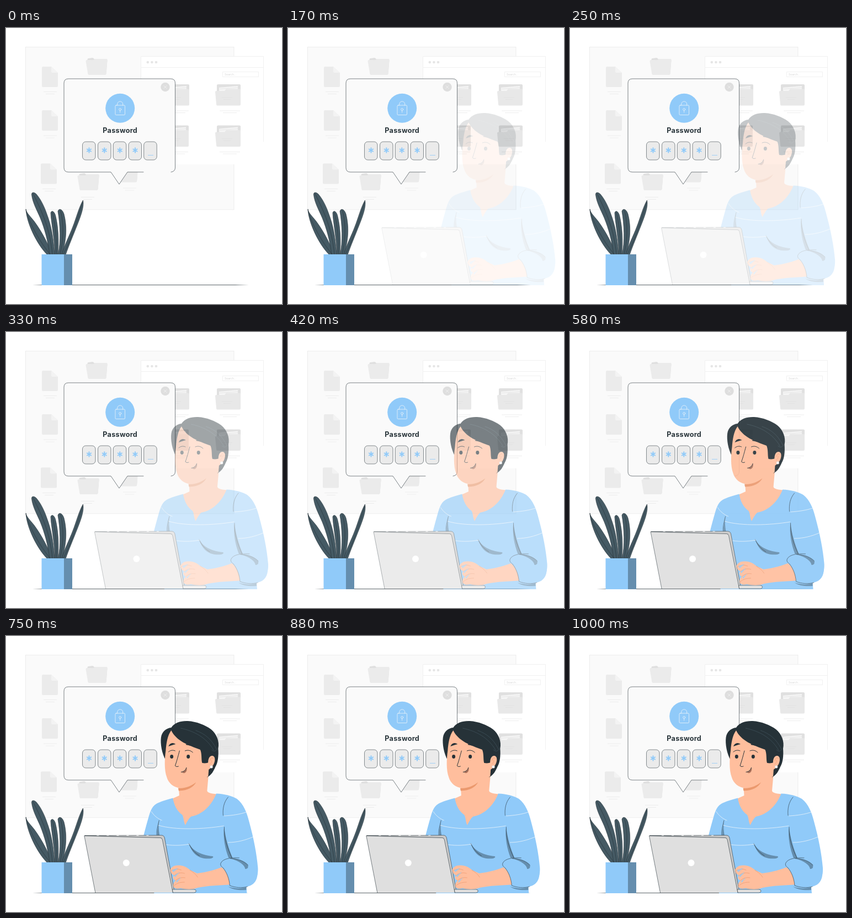
Animation of 500 by 500 pixels, one loop 1040 ms. Source, as an HTML page:

```html
<!DOCTYPE html>
<html lang="en">
<head>
<meta charset="utf-8">
<title>Password prompt</title>
<style>
  html, body { margin: 0; width: 100%; height: 100%; overflow: hidden; background: #fff; }
  svg { display: block; width: 100%; height: 100%; }
  text { font-family: Inter, "Open Sans", sans-serif; }
  .blue { fill: #90caf9; }
  .shade { fill: #658eae; }
  .dark { fill: #263238; }
  .skin { fill: #ffbe9d; }
  .ink { fill: none; stroke: #263238; stroke-width: .6; stroke-linecap: round; stroke-linejoin: round; }
  .pale { fill: none; stroke: #fafafa; stroke-width: .7; stroke-linecap: round; }
  .fold { fill: none; stroke: #eb996e; stroke-width: .7; stroke-linecap: round; }
  .caption { fill: none; stroke: #ebebeb; stroke-width: .9; }
  .frame { fill: none; stroke: #ebebeb; stroke-width: .7; }
  .leaves { fill: #455a64; stroke: #263238; stroke-width: .6; }
</style>
</head>
<body>
<svg viewBox="0 0 500 500">
  <defs>
    <g id="file">
      <path fill="#ebebeb" d="M2 0H17L29 11V35Q29 37 27 37H2Q0 37 0 35V2Q0 0 2 0Z"/>
      <path fill="#f3f3f3" d="M17 0L29 11H19Q17 11 17 9Z"/>
    </g>
    <path id="lines" class="caption" d="M0 0H24M4 4H20"/>
    <g id="folder">
      <path fill="#e0e0e0" d="M3 3Q3 1 5 1L12 0Q14 0 15 2L37 2Q39 2 39 5L37 29H4Z"/>
      <path fill="#ebebeb" d="M0 6Q0 4 2 4H14L16 2H37Q39 2 39 4L37 29Q37 31 35 31H6Q4 31 4 29Z"/>
    </g>
    <g id="docs">
      <path fill="#e0e0e0" d="M3 2Q3 0 5 0H44Q46 0 46 2V36H3Z"/>
      <path fill="#f5f5f5" d="M7 6L41 3V15H7Z"/>
      <path fill="none" stroke="#e6e6e6" d="M8 8.5L41 6"/>
      <path fill="#e8e8e8" d="M0 14Q0 12 2 12H17L20 8.5H44Q46 8.5 46 10.5V36Q46 38.5 44 38.5H4Q2 38.5 2 36Z"/>
      <path fill="none" stroke="#e0e0e0" stroke-width=".7" d="M12 24H31M15 27.500H28"/>
      <path class="caption" d="M8 48H45M14 51.500H39"/>
    </g>
    <path id="star" fill="none" stroke="#90caf9" stroke-width="2" d="M0-5V5M-4.300-2.500L4.300 2.500M-4.300 2.500L4.300-2.500"/>
    <rect id="cell" width="23.500" height="33" rx="6" fill="#ebebeb" stroke="#263238" stroke-width=".55"/>
  </defs>

  <!-- desktop panel -->
  <rect x="35.500" y="34.500" width="377.500" height="294.500" fill="#fafafa" stroke="#ebebeb" stroke-width=".9"/>
  <use href="#file" x="65" y="70"/><use href="#lines" x="68" y="115.500"/>
  <use href="#file" x="65" y="149"/><use href="#lines" x="68" y="195"/>
  <use href="#file" x="63" y="245.500"/><use href="#lines" x="66" y="291.500"/>
  <use href="#folder" x="144.500" y="54"/>
  <use href="#folder" x="129.500" y="263"/><use href="#lines" x="136" y="306.500"/>
  <use href="#folder" x="200" y="248.500"/><use href="#lines" x="212" y="290"/>

  <!-- browser window -->
  <path fill="#fff" d="M244.500 51.500H466.500V247H244.500Z"/>
  <path class="frame" d="M244.500 247V51.500H466.500V206M244.500 71.500H466.500"/>
  <g fill="#e6e6e6">
    <circle cx="256.800" cy="62" r="2.300"/><circle cx="264.400" cy="62" r="2.300"/><circle cx="272" cy="62" r="2.300"/>
  </g>
  <path class="frame" d="M392.500 79.500H457.500V88.500H392.500Z"/>
  <text x="396" y="85.500" font-size="5" fill="#d6d6d6">Search...</text>
  <use href="#docs" x="379" y="102"/><use href="#docs" x="379" y="176.500"/>
  <use href="#docs" x="286" y="102"/><use href="#docs" x="285" y="176.500"/>

  <!-- dialog -->
  <path fill="#fafafa" d="M113 92H298.500Q306.500 92 306.500 100V253Q306.500 261 298.500 261H220L205 283L190 261H113Q105 261 105 253V100Q105 92 113 92Z"/>
  <path class="ink" d="M249 261H220L205 283L190 261H113Q105 261 105 253V100Q105 92 113 92H298.500Q306.500 92 306.500 100V253Q306.500 260 299 261"/>
  <circle cx="288.500" cy="107" r="8.200" fill="#dedede"/>
  <path class="pale" d="M286 104.500L291 109.500M291 104.500L286 109.500"/>
  <circle class="blue" cx="206.700" cy="145.300" r="26.500"/>
  <rect class="pale" x="198" y="140" width="17.500" height="17.500" rx="1.500"/>
  <path class="pale" d="M201.700 140V138A5 5 0 0 1 211.700 138V140M206.700 149.500V153"/>
  <circle class="pale" cx="206.700" cy="147.500" r="2"/>
  <text class="dark" x="206.700" y="190.300" font-size="12.600" font-weight="700" letter-spacing=".3" text-anchor="middle">Password</text>
  <use href="#cell" x="138.500" y="206"/><use href="#cell" x="166.500" y="206"/>
  <use href="#cell" x="194.300" y="206"/><use href="#cell" x="222" y="206"/>
  <use href="#cell" x="249.700" y="206"/>
  <use href="#star" x="150.500" y="221.500"/><use href="#star" x="178.300" y="221.500"/>
  <use href="#star" x="206.300" y="221.500"/><use href="#star" x="234" y="221.500"/>
  <path fill="none" stroke="#90caf9" stroke-width=".8" d="M257 230.500H267"/>

  <!-- table and plant -->
  <path class="dark" d="M48 465.400L70 465.100H415L440 465.400L415 465.700H70Z"/>
  <g class="leaves">
    <path d="M36 328C37 352 55 391 75 411H84C78 395 66 370 51 350C44 341 37 335 36 328Z"/>
    <path d="M46.500 302C46 297 51 297 55 301C62 309 69 322 74 337C82 358 86 380 88 411H79C76 385 70 364 62 344C56 330 48 316 46.500 302Z"/>
    <path d="M81 335C82 330 87 331 89.500 339C95 360 96 388 94 411H88C89 386 82 355 81 335Z"/>
    <path d="M94 332C96 326 102 328 105 337C112 364 108 391 101 411H94C100 388 98 355 94 332Z"/>
    <path d="M139.500 312C142 324 135 342 129 357C122 375 113 396 108 411H101C105 395 115 376 121 360C127 345 132 325 139.500 312Z"/>
  </g>
  <path class="ink" d="M36 330C43 355 61 387 80 410M49 300C66 334 80 365 84 410M84 334C90 360 92 384 91 410M99 331C106 360 103 387 98 410M139 315C129 350 117 384 104 410"/>
  <rect class="blue" x="64.500" y="410" width="41" height="56"/>
  <rect class="shade" x="105" y="410" width="15" height="56"/>

  <g id="worker" opacity="0">
    <!-- neck and shirt -->
    <path class="skin" d="M314 262L315.500 289L300 296L326 344L390 305V287C374 286 366 284 366 280L370 235Z"/>
    <path class="blue" d="M304 293.500C292 297 281 300 274 304C264 310 262 322 258 335C255 346 252 356 250 366L270 466H438L437 454C451 450 459 438 458 420C456 395 450 365 442 336C438 320 432 304 420 295C412 290 398 286 382.500 285.500C374 308 356 324 337 327C333 330 330 336 326.500 342.500C323 336 324 329 321 324C312 318 306 307 304 293.500Z"/>
    <path class="shade" d="M397 346C394 364 399 387 405 402H412C405 385 399 366 397 346Z"/>
    <path class="shade" d="M333 376C341 389 352 396 376 399C378 400 377 402 373 403C354 405 340 398 333 376Z"/>
    <path class="shade" d="M279 335C277 346 275 354 276 362H280C278 352 278 344 279 335Z"/>
    <path class="shade" d="M404 454C416 458 428 458 437 455V460C426 461 412 460 404 454Z"/>
    <path class="ink" d="M404 292C396 301 394 313 395 325M397 346C396 364 403 386 411 402M333 376C337 386 344 393 352 398M279 334C276 346 274 354 275 362"/>
    <path class="pale" d="M265 318C270 326 277 331 284 334M278 343C308 352 360 350 396 344M397 326C412 325 426 323 437 319M286 377C300 380 318 380 334 377M404 374C420 374 435 370 449 364"/>

    <!-- head -->
    <path class="dark" d="M291 225C284 213 281 195 282.500 184C284 173 292 167 301 166C307 157 318 153.500 331 154C347 155 362 161 373 169C383 177 389 191 386 204C387 216 386 229 381 237C378 244 374 252 366 256L310 240Z"/>
    <path class="skin" d="M301 171C294 180 292 195 291 208C289 222 288 243 293 256C296 267 306 275 318 275.500C330 275 352 267 368 254L370 228L357 228C357 219 357 212 354 206C332 198 310 190 301 171Z"/>
    <path fill="#eb996e" d="M313.500 275.500C326 277 338 271 346 265C341 274 331 280 314.500 280.500Z"/>
    <path class="dark" d="M320 182C330 193 342 201 353 205C357 212 355 223 357 230C363 231 366 230 369 229L373 205L350 180Z"/>
    <path class="skin" d="M368 232C367 222 371 216 376 217C381 218 381 226 378 232C375 238 369 242 367 243Z"/>
    <path class="fold" d="M371 226C373 220 376 220 377 222M371 232C374 230 375 227 374 225"/>
    <circle cx="373.700" cy="237" r="2.500" fill="#fff" stroke="#bbb" stroke-width=".4"/>
    <path fill="none" stroke="#455a64" stroke-width=".6" d="M318 167C342 172 365 184 378 207M345 171C362 177 374 187 383 205M374 206C378 210 381 209 384 205"/>

    <path class="dark" d="M296 200C298 194 304 192 309 196C304 197 301 198 296 200Z"/>
    <path class="dark" d="M327 197C332 193 338 194 342 200C337 199 333 198 327 197Z"/>
    <path class="ink" style="stroke-width:1" d="M296 210C299 207 304 206 308 208M326 208C331 206 336 207 340 211M316 208C313 219 311 227 308 235C310 237 312 237 314 236"/>
    <ellipse class="dark" cx="301.800" cy="218.500" rx="3" ry="3.400"/>
    <ellipse class="dark" cx="331.800" cy="218.500" rx="3" ry="3.400"/>
    <path fill="#a9705a" d="M319 246.500C324 246 327 243 329 238.500C330 243 328 248 324 248.500Z"/>
    <path class="ink" style="stroke-width:1" d="M319 246.500C324 246 327 243 328.500 238.500"/>

    <!-- laptop -->
    <path fill="#c9c9c9" stroke="#263238" stroke-width=".6" d="M144 361.500L283 361Q288 361 289 366L306 459L303 465L283 366Z"/>
    <path fill="#dfdfdf" d="M143.500 362L281 365.500Q284 365.500 285 369L304 465H163.500Z"/>
    <path class="ink" d="M163.500 465L143.500 362L281 365.500Q284 365.500 285 369L304 465"/>
    <path fill="none" stroke="#fafafa" stroke-dasharray="4 14" d="M166 361.200H272"/>
    <circle cx="219.500" cy="411" r="6" fill="#fff"/>
    <path fill="#e0e0e0" stroke="#263238" stroke-width=".6" d="M303 459H342Q346 459 346 462T342 465H304Z"/>

    <!-- arm -->
    <path class="skin" d="M299 424C301 418 307 415 314 415.500C322 415 330 419 335 424L348 430C366 428 383 423 397 417L410 450C389 452 367 452 349 456C339 460 327 459 318 457C311 459 305 457 305 453C304 449 306 446 309 443C304 441 303 437 306 434L301 430Z"/>
    <path class="fold" d="M299 426C307 422 312 421 319 424M306 434C312 429 319 428 325 430M309 443C314 438 320 437 326 438M305 453C312 447 318 446 325 446M335 424C341 428 345 431 349 437"/>
    <path fill="#90caf9" fill-opacity=".8" d="M302 424L314 420L305 428ZM306 434L317 427L308 437ZM310 444L319 437L311 447Z"/>
    <path class="blue" d="M391 411C397 402 413 400 426 404L455 410C461 435 456 450 439 454C427 456 417 456 407 452C406 438 401 425 391 418Z"/>
    <path class="shade" d="M408 403C421 403 434 408 440 415C441 420 439 422 435 422C434 415 425 408 408 403Z"/>
    <path class="ink" d="M424 402C410 401 395 403 391 411C389 415 392 418 395 420C402 429 406 440 407 452C417 456 429 457 439 454M408 403C421 403 434 408 440 415"/>
  </g>
</svg>
<script>
  const worker = document.getElementById('worker');
  const LOOP = 1040, STEP = 1000 / 24, LEAD = 0.02, DISTANCE = 30;

  const curve = (a, b, s) => 3 * a * s * (1 - s) ** 2 + 3 * b * s * s * (1 - s) + s ** 3;

  // cubic-bezier(.36, -.01, .5, 1.38), solved by bisection
  function ease(x) {
    let lo = 0, hi = 1;
    for (let i = 0; i < 24; i++) {
      const mid = (lo + hi) / 2;
      if (curve(.36, .5, mid) < x) lo = mid; else hi = mid;
    }
    return curve(-.01, 1.38, lo);
  }

  const start = performance.now();

  function draw() {
    const time = Math.max(0, performance.now() - start) % LOOP;
    const step = Math.floor((time + 4) / STEP);
    const p = step < 2 ? 0 : ease(Math.min(1, step / 24 + LEAD));
    worker.setAttribute('opacity', Math.min(1, p));
    worker.setAttribute('transform', `translate(${DISTANCE * (1 - p)} 0)`);
    requestAnimationFrame(draw);
  }
  draw();
</script>
</body>
</html>
```
